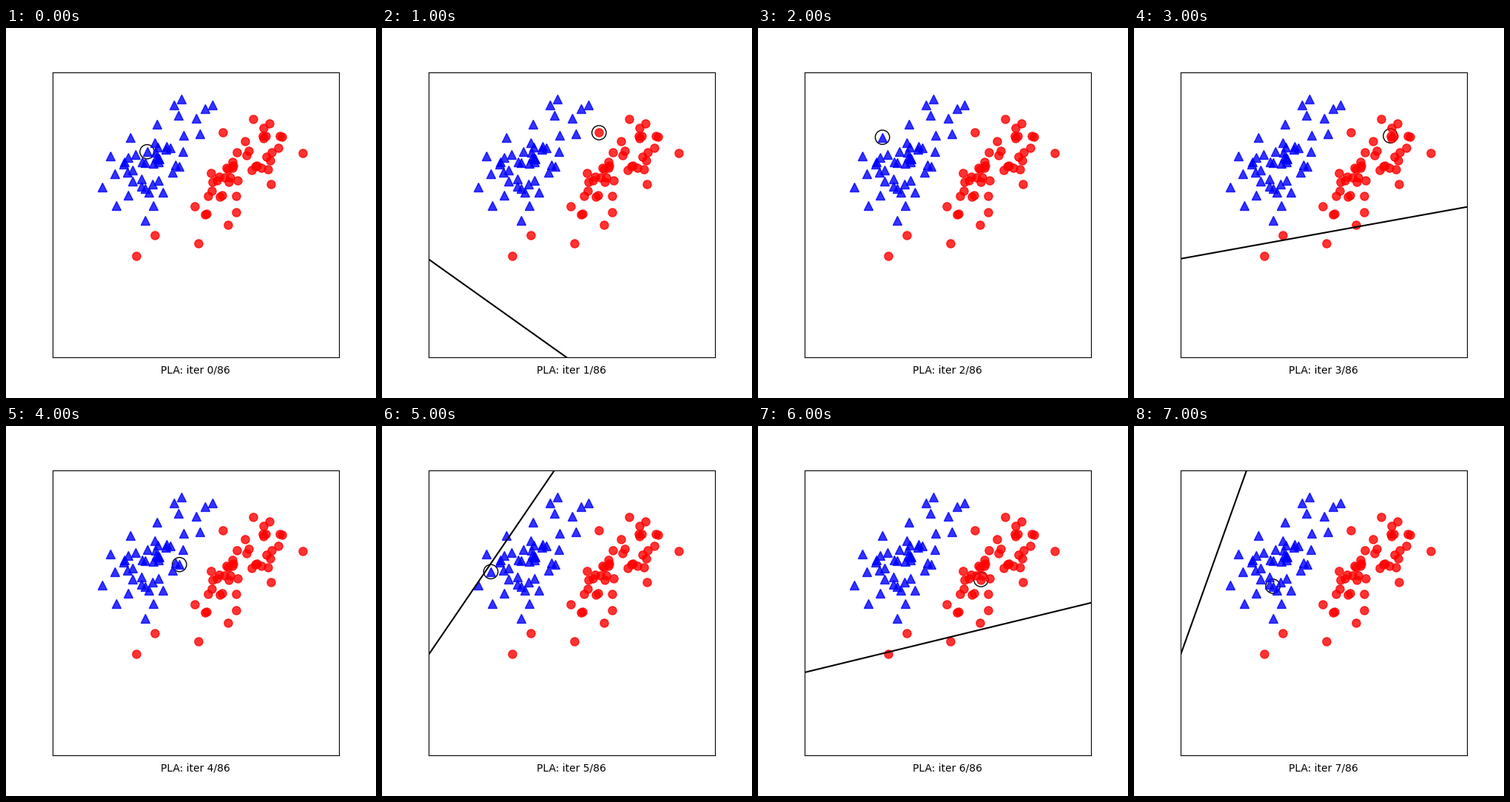
Write a matplotlib script that moves like this. It is 500 px wide and 500 px high and loops after 8 s.

```python
import numpy as np
import matplotlib.pyplot as plt
from matplotlib.animation import FuncAnimation

TOTAL, N = 86, 50


def cloud(mean):
    """Correlated Gaussian cloud, covariance [[.3, .2], [.2, .3]]."""
    z = np.random.randn(N, 2)
    along, across = 0.5 * z[:, 0], np.sqrt(0.05) * z[:, 1]
    return np.column_stack([mean[0] - along - across, mean[1] - along + across])


def nearest(points, target):
    return points[np.argmin(np.hypot(*(points - target).T))]


np.random.seed(2)
blue = cloud((2, 2))
red = cloud((4, 2))

# Cloud and rough place of the misclassified point behind each update
picks = [
    (blue, (1.98, 2.33)), (red, (3.58, 2.73)), (blue, (1.64, 2.63)),
    (red, (4.397, 2.67)), (blue, (2.66, 2.02)), (blue, (1.31, 1.87)),
    (red, (3.70, 1.69)), (blue, (1.945, 1.55)),
]
chosen = [nearest(points, place) for points, place in picks]

# Perceptron rule: add blue points, subtract red ones
weights = [np.array([-1.154, -0.425, -0.152])]
for (points, _), point in zip(picks, chosen):
    sign = 1 if points is blue else -1
    weights.append(weights[-1] + sign * np.array([1, *point]))

fig, ax = plt.subplots(figsize=(5, 5), dpi=100)
fig.subplots_adjust(left=0.125, right=0.9, bottom=0.11, top=0.88)
ax.plot(*blue.T, "b^", markersize=8, alpha=0.8)
ax.plot(*red.T, "ro", markersize=8, alpha=0.8)
boundary, = ax.plot([], [], "k", linewidth=1.5)
ring = ax.add_patch(plt.Circle((0, 0), 0.15, color="k", fill=False))
ax.axis([0, 6, -2, 4])
ax.set_xticks([])
ax.set_yticks([])
label = ax.set_xlabel("", labelpad=7.5)


def update(i):
    bias, wx, wy = weights[i]
    x = np.array([-100, 100])
    boundary.set_data(x, -(bias + wx * x) / wy)
    ring.set_center(chosen[i])
    label.set_text(f"PLA: iter {i}/{TOTAL}")
    return boundary, ring, label


anim = FuncAnimation(fig, update, frames=len(picks), interval=1000,
                     init_func=lambda: update(0), repeat=True)
plt.show()
```
